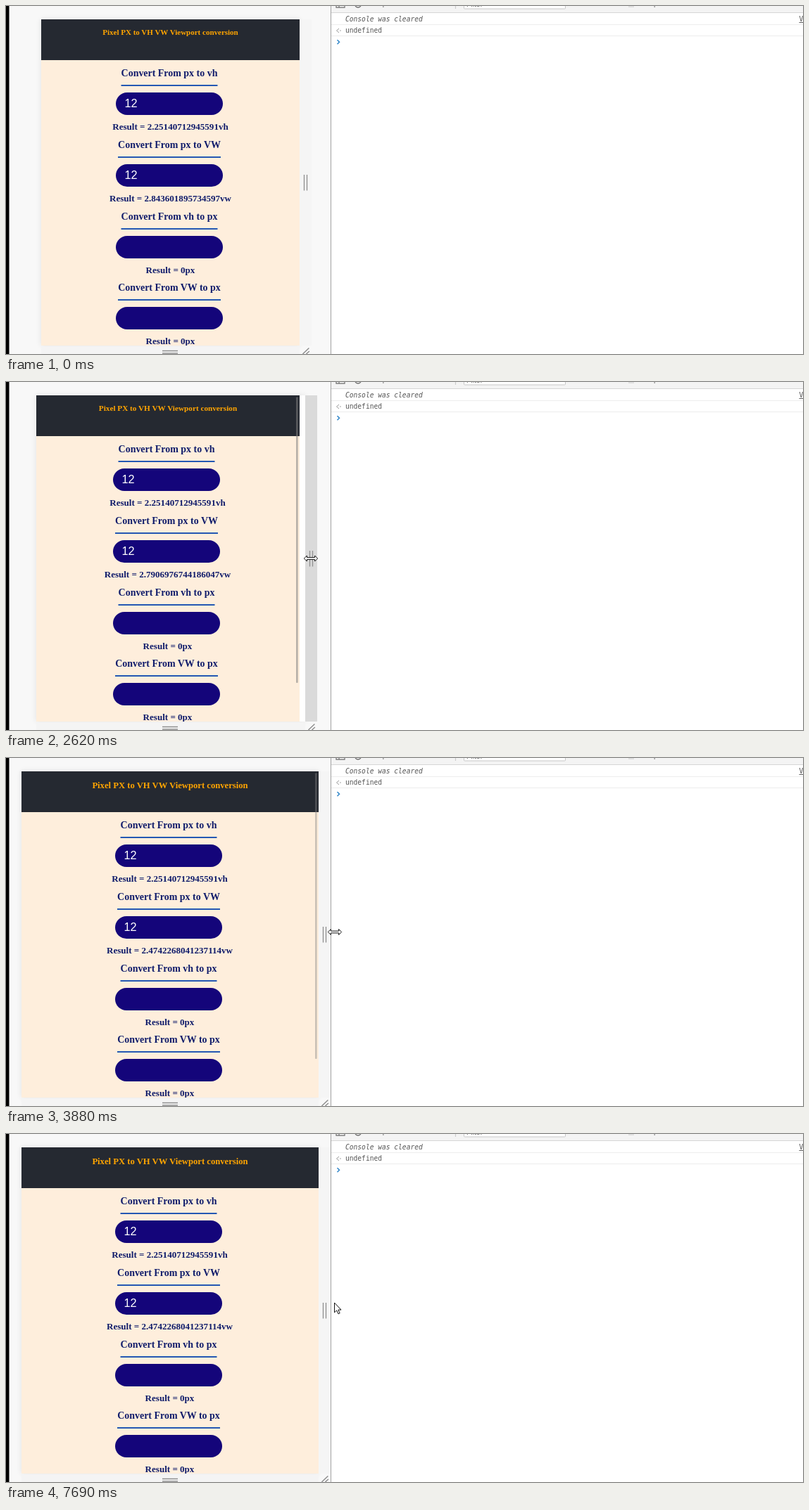
Animation of 1132 by 495 pixels, one loop 8000 ms. Source, as an HTML page:

```html
<!DOCTYPE html>
<html lang="en">
<head>
<meta charset="utf-8">
<title>Viewport unit converter</title>
<style>
html, body { margin: 0; width: 100%; height: 100%; overflow: hidden; background: #fff; }
svg { display: block; }
.serif { font-family: "Liberation Serif", "Times New Roman", serif; font-weight: bold; text-anchor: middle; }
.head { font-size: 13.95px; fill: #101c6b; }
.result { font-size: 13.05px; fill: #101c6b; }
.value { font: 16.3px "Liberation Sans", Arial, sans-serif; fill: #fff; }
.mono { font: 9.6px "DejaVu Sans Mono", monospace; fill: #555; }
.slant { font-style: italic; }
.tool { font: 10.4px "Liberation Sans", Arial, sans-serif; fill: #666; }
</style>
</head>
<body>
<svg width="1132" height="495" viewBox="0 0 1132 495">
  <defs>
    <filter id="soft" x="-10%" y="-10%" width="120%" height="120%"><feGaussianBlur stdDeviation="4"/></filter>
    <clipPath id="pane"><rect x="4" y="0" width="457" height="495"/></clipPath>
    <clipPath id="view"><rect x="0" y="19" width="461" height="464"/></clipPath>
  </defs>

  <rect width="461" height="495" fill="#f8f8f8"/>
  <g clip-path="url(#pane)">
    <rect id="shadow" y="19" height="464" fill="#000" opacity=".09" filter="url(#soft)"/>
    <rect id="bottom" y="484" height="11" fill="#f4f4f4"/>
    <rect id="strip" y="19" width="17" height="464"/>
    <rect id="frame" y="19" height="464" fill="#fff"/>
    <g clip-path="url(#view)">
      <rect id="page" y="19" height="464" fill="#feeedc"/>
      <rect id="bar" y="19" height="58" fill="#252931"/>
      <text id="title" class="serif" fill="#ffa500">Pixel PX to VH VW Viewport conversion</text>
      <g id="form"></g>
      <rect id="scroll" y="21.5" width="2.7" height="406.5" rx="1" fill="#808080"/>
    </g>
    <path id="grip" d="M0 495L9 486.5M5 495L9.5 491" stroke="#8c8c8c" stroke-width="1.4"/>
    <path d="M222 490.5H244M222 494H244" stroke="#8f8f8f" stroke-width="1.5"/>
    <path id="handle" d="M-2 240V262.5M2 240V262.5" stroke="#8f8f8f" stroke-width="1.3"/>
  </g>
  <rect width="4.5" height="495" fill="#000"/>

  <rect x="461" width="671" height="495" fill="#fff"/>
  <rect x="461" width="671" height="9" fill="#f4f4f4"/>
  <path d="M461 9.5H1132" stroke="#d6d6d6"/>
  <path d="M461 26.5H1132M461 42.5H1132" stroke="#ededed"/>
  <g fill="none" stroke="#6e6e6e" stroke-width="1.2">
    <path d="M469 0V2.2H481V0M473 0V2M496 0Q500 4 504 0"/>
    <path d="M638.5 0V4M884 1H892" stroke="#ccc"/>
  </g>
  <rect x="650.5" y="-12" width="144" height="16" rx="1" fill="#fff" stroke="#c8c8c8"/>
  <text class="tool" x="654" y="1">Filter</text>
  <text class="tool" x="526" y="0">top</text>
  <text class="tool" x="920" y="0">p</text>
  <text class="mono slant" x="482" y="22">Console was cleared</text>
  <text class="mono" x="482" y="38.4">undefined</text>
  <text class="mono" x="1126.5" y="22" text-decoration="underline">V</text>
  <path d="M473 32L469.5 35L473 38" fill="none" stroke="#999"/>
  <circle cx="475" cy="35" r=".8" fill="#999"/>
  <path d="M470.5 48.3L473.5 51.3L470.5 54.3" fill="none" stroke="#2f86c9" stroke-width="1.5"/>
  <path d="M461.5 0V495" stroke="#a3a3a3"/>
  <path id="cursor" fill="#fff" stroke="#111"/>
</svg>
<script>
const LOOP = 8000, STEP = 75, SCALE = 0.87, MID = 232.9;
const NARROW = 422, WIDE = 485, GRAB_X = 425, GAIN = 2.1;
const ENTER = 520, GRAB = 2470, DROP = 4820, REGRAB = 6680, REDROP = 7690;
const ARROW = 'M.5 .5V14.4L3.7 11.4L6 16.4L8.1 15.4L5.9 10.6H10Z';
const RESIZE = 'M-9.6 0L-5.6 -4V-1.4H5.6V-4L9.6 0L5.6 4V1.4H-5.6V4Z';

// Pointer moves: start, end, destination x, y
const MOVES = [
  [ENTER, 760, 787, 401],
  [920, 1050, 472, 306],
  [1255, 1330, 468, 305],
  [1330, 1930, GRAB_X, 251],
  [GRAB, 2620, 433, 251],
  [2620, 3240, 447.8, 249],
  [3260, 3880, 467, 247.5],
  [3900, 4210, 474.5, 247],
  [4885, 5610, 458.5, 244],
  [6605, 7080, 483, 242],
  [7080, 7460, 471, 240],
  [7465, REDROP, 466, 239.5]
];

const $ = id => document.getElementById(id);
const set = (id, attrs) => {
  for (const k in attrs) $(id).setAttribute(k, attrs[k]);
};

const ROWS = [['px to vh', '12'], ['px to VW', '12'], ['vh to px', ''], ['VW to px', '']];
$('form').innerHTML = ROWS.map(([units, value], i) => {
  const half = i % 2 ? 73 : 68.5;
  return `<g transform="translate(0 ${Math.round(i * 101.8)})">
    <text class="serif head" y="100.3">Convert From ${units}</text>
    <rect x="${-half}" y="112" width="${2 * half}" height="2" fill="#2458b3"/>
    <rect x="-76" y="123" width="152" height="32" rx="16" fill="#14057a"/>
    <text class="value" x="-63.6" y="144">${value}</text>
    <text class="serif result" x="1.5" y="176">Result = 0px</text>
  </g>`;
}).join('');
const results = document.querySelectorAll('.result');
results[0].textContent = 'Result = 2.25140712945591vh';

// The pointer advances in even screen updates, about one per STEP
function pointer(t) {
  let x = 956, y = 462;
  for (const [start, end, toX, toY] of MOVES) {
    if (t < start) break;
    const n = Math.round((end - start) / STEP);
    const p = Math.min(1, Math.floor((t - start) / (end - start) * n + 1e-6) / n);
    x += (toX - x) * p;
    y += (toY - y) * p;
  }
  return [x, y];
}

// Viewport width in CSS pixels, pulled by the pointer
const viewport = t => t < GRAB ? NARROW : Math.min(WIDE, NARROW + GAIN * (pointer(t)[0] - GRAB_X));

function draw(t) {
  const [x, y] = pointer(t);
  const width = Math.round(viewport(t) * SCALE);
  const left = Math.ceil(MID - viewport(t) * SCALE / 2), right = left + width;
  // The page relayouts one update behind its frame
  const view = Math.round(viewport(t - STEP));
  const pageWidth = Math.round(view * SCALE), center = left + pageWidth / 2;
  const size = view * SCALE * 0.03;
  const hover = x >= right && x <= right + 17.4 && y > 19 && y < 484;
  const dragging = t >= GRAB && t < DROP || t >= REGRAB && t < REDROP;

  for (const id of ['shadow', 'bottom', 'frame']) set(id, { x: left, width });
  for (const id of ['page', 'bar']) set(id, { x: left, width: pageWidth });
  set('title', { x: center, y: 31 + size * 0.91, 'font-size': size });
  set('form', { transform: `translate(${Math.round(center - 1.6)} 0)` });
  results[1].textContent = `Result = ${1200 / view}vw`;

  const fade = t < GRAB ? 0 : Math.min(1, Math.max(0, (4140 - t) / 340));
  set('scroll', { x: left + pageWidth - 5, opacity: 0.55 * fade });
  set('strip', { x: right, fill: hover ? '#dadada' : '#f5f5f5' });
  set('handle', { transform: `translate(${right + 8.5} 0)` });
  set('grip', { transform: `translate(${right + 4.4} 0)` });
  set('cursor', {
    d: hover || dragging ? RESIZE : ARROW,
    transform: `translate(${x} ${y})`,
    visibility: t < ENTER ? 'hidden' : 'visible'
  });
}

const begin = performance.now();
function tick() {
  draw((performance.now() - begin) % LOOP);
  requestAnimationFrame(tick);
}
tick();
</script>
</body>
</html>
```
